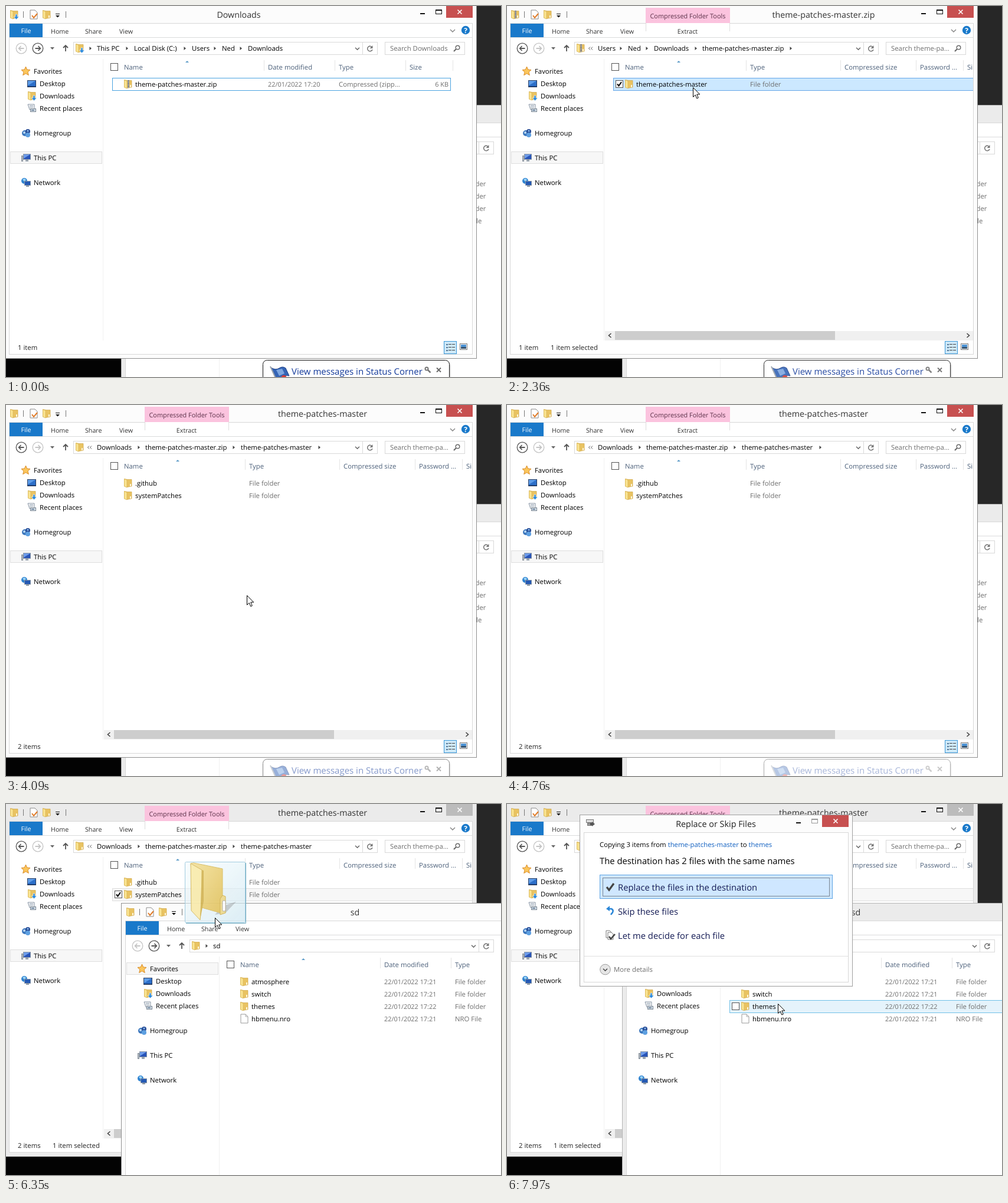
An HTML page that plays this animation: 839 by 630 pixels, repeating every 8 s.

```html
<!DOCTYPE html>
<html lang="en">
<head>
<meta charset="utf-8">
<title>Copying theme patches</title>
<style>
html, body { margin: 0; width: 100%; height: 100%; overflow: hidden; background: #030303; }
svg { display: block; width: 839px; height: 630px; }
text { font-family: "Open Sans", "Noto Sans", sans-serif; text-rendering: geometricPrecision; white-space: pre; }
</style>
</head>
<body>
<svg id="stage" viewBox="0 0 839 630" xmlns="http://www.w3.org/2000/svg"></svg>
<script>
const LOOP = 8000, STEP = 68.4;
const stage = document.getElementById('stage');
const GREY = '#6d6d6d', HEAD = '#4c607a', BLUE = '#1979ca';

// Drawing helpers; y of text is its visual middle
const rect = (x, y, w, h, fill, extra = '') => `<rect x="${x}" y="${y}" width="${w}" height="${h}" fill="${fill}" ${extra}/>`;
const box = (x, y, w, h, fill, line) => rect(x + .5, y + .5, w - 1, h - 1, fill, `stroke="${line}"`);
const path = (d, fill, line = 'none', w = 1) => `<path d="${d}" fill="${fill}" stroke="${line}" stroke-width="${w}"/>`;
const stroke = (d, line, w = 1) => path(d, 'none', line, w);
const circle = (x, y, r, fill, line = 'none', w = 1) => `<circle cx="${x}" cy="${y}" r="${r}" fill="${fill}" stroke="${line}" stroke-width="${w}"/>`;
const text = (x, y, s, fill = '#000', size = 11.35, anchor = 'start') =>
  `<text x="${x}" y="${Math.round(y + size * .36)}" font-size="${size}" fill="${fill}" text-anchor="${anchor}">${s}</text>`;
const at = (x, y, body, extra = '') => `<g transform="translate(${x} ${y})" ${extra}>${body}</g>`;
const chevron = (x, y, r = 3.5, line = '#555') => stroke(`M${x - r},${y - r / 2}l${r},${r}l${r},${-r}`, line, 1.5);
const vline = (x, y, h, line = '#e4e4e4') => rect(x, y, 1, h, line);

const folder = () => path('M.5 .5L6 1.500H13V13L5 14.500L.5 13Z', '#e9c362', '#cfa546', .7) +
  path('M.5 .5L5 2.500V15L.5 13Z', '#f9e391', '#d6b04e', .6) + rect(10, 9, 2, 4, '#fff8df');
const icons = {
  folder,
  zip: () => folder() + rect(6, 1, 3, 13, '#b9b9b9') + stroke('M7.5 1V14', '#5c5c5c', 3).replace('/>', ' stroke-dasharray="1 1.5"/>'),
  down: () => folder() + path('M9 7H12V11H15L10.500 16L6 11H9Z', '#2b8be0', '#fff', .6),
  file: () => path('M1 0H9L13 4V15H1Z', '#fff', '#999') + stroke('M9 0V4H13', '#aaa'),
  task: () => path('M1 0H9L13 4V15H1Z', '#fff', '#8b8b8b') + stroke('M4 9L7 13L13 6', '#e07b28', 2),
  star: () => path('M7.5 0L9.700 5L15 5.500L11 9.200L12.300 14.500L7.500 11.700L2.700 14.500L4 9.200L0 5.500L5.300 5Z', '#fbc65c', '#d98a25'),
  desk: () => box(0, 2, 15, 12, '#2d6fc9', '#2b3f63') + path('M1 3H14L1 11Z', '#5d9ce8') + rect(1, 12, 13, 1, '#173a72'),
  recent: () => path('M1 1H12V10H4Z', '#f4f4f4', '#8795a5') + stroke('M4 3.500H10M4 6H10M5 8.500H10', '#8fa1b4') + box(5, 8, 10, 6, '#dbe4ec', '#75828f') + rect(7, 10, 5, 2, '#778ca3'),
  group: () => circle(6, 8, 5, '#3b76bd') + circle(11, 5, 4, '#2a4d96') + circle(11, 11, 4, '#5d9fe0') + circle(5, 7, 2, '#b9d8f4') + circle(11, 4, 1.5, '#8fc0ef'),
  pc: () => box(3, 1, 13, 10, '#2854b8', '#8c97a5') + path('M4 2H15L4 9Z', '#6c9bea') + rect(7, 11, 5, 3, '#9aa5b1') + box(0, 4, 3, 10, '#ccd3db', '#7e8893'),
  net: () => circle(5, 5, 5, '#2f83d0') + path('M2 3Q5 -1 8 3L5 6Z', '#9bd3f5') + box(5, 5, 11, 8, '#2459b4', '#8794a3') + rect(8, 13, 5, 2, '#8d99a6')
};
const icon = (name, x, y) => at(x, y, icons[name]());

const check = (x, y, on) => box(x, y, 13, 13, '#fff', '#555') + (on ? stroke(`M${x + 3} ${y + 6.500}L${x + 5.500} ${y + 9.500}L${x + 10} ${y + 3}`, '#000', 2) : '');
const rowLook = {
  focus: ['#fff', '#4ba3e0'], hover: ['#e5f3fb', '#70c0e7'], sel: ['#cce8ff', '#66a7e8'],
  old: ['#f7f7f7', '#dedede'], drop: ['#d1e8ff', '#84bdee']
};

function navPane(mark) {
  const items = [['star', 111, 'Favorites'], ['desk', 132, 'Desktop', 10], ['down', 153, 'Downloads', 10], ['recent', 174, 'Recent places', 10],
    ['group', 216, 'Homegroup'], ['pc', 258, 'This PC'], ['net', 300, 'Network']];
  return box(7, mark - 11, 156, 21, '#f7f7f7', '#dedede') +
    items.map(([i, y, s, dx = 0]) => icon(i, 26 + dx + (i === 'down' ? 1 : 0), y - 8) + text(47 + dx, y, s)).join('');
}

function captions(x, y, active, maxLine = '#111') {
  return rect(x - 44, y + 12, 8, 2, '#111') + box(x - 18, y + 6, 11, 8, 'none', maxLine) + rect(x - 18, y + 6, 11, 2, maxLine) +
    rect(x, y, 45, 20, active ? '#c75050' : '#bcbcbc') + stroke(`M${x + 19.500} ${y + 6.500}l7 7m0 -7l-7 7`, '#fff', 1.6);
}

function roundButton(x, on, dir) {
  const c = on ? '#555' : '#c4c4c4';
  return circle(x, 72, 8.8, '#fff', c, 1.3) + stroke(`M${x - 4.500 * dir} 72H${x + 4 * dir}M${x + .5 * dir} 68l${3.8 * dir} 4l${-3.8 * dir} 4`, c, 1.8);
}

function explorer(o) {
  const skin = o.active ? '#fcfcfc' : '#ebebeb';
  let s = box(-2, -1, 800, 600, skin, o.active ? '#8f8f8f' : '#b5b5b5') + box(5, 29, 786, 563, '#fff', '#d8d8d8');
  // title bar
  s += icon(o.icon, 7, 7) + vline(29, 9, 11, '#777') + icon('task', 40, 7) + icon('folder', 62, 7) +
    rect(84, 13, 7, 1, '#111') + path('M84 16h7l-3.500 3.500Z', '#111') + vline(101, 9, 11, '#777');
  s += text(o.tools ? 536.5 : 394.5, 15, o.title, '#333', 14.25, 'middle') + captions(746, 0, o.active);
  // ribbon tabs
  s += rect(6, 53, 784, 1, '#dadbdc') + rect(6, 30, 56, 23, BLUE) + text(34, 42, 'File', '#fff', 10.7, 'middle') +
    text(76, 43, 'Home', '#333', 10.7) + text(134, 43, 'Share', '#333', 10.7) + text(192, 43, 'View', '#333', 10.7);
  if (o.tools) s += rect(235, 3, 143, 26, '#fbc3de') + rect(236, 29, 141, 1, '#fff') + text(306.5, 17, 'Compressed Folder Tools', '#5b3149', 10.9, 'middle') +
    vline(235, 29, 14, '#ddd') + vline(377, 29, 14, '#ddd') + text(306, 43, 'Extract', '#333', 10.7, 'middle');
  s += chevron(757, 42, 4, '#888') + circle(779, 41, 7.2, BLUE) + `<text x="779" y="45.500" font-size="12" font-weight="700" fill="#fff" text-anchor="middle">?</text>`;
  // address row
  s += roundButton(26, o.back, -1) + roundButton(54, !o.back, 1) + path('M75 70h7l-3.500 4Z', '#666') +
    stroke('M101 77V67M97 71l4 -4l4 4', '#555', 1.8);
  s += box(114, 61, 491, 22, '#fff', '#d9d9d9') + box(604, 61, 26, 22, '#fff', '#d9d9d9') + box(642, 61, 136, 22, '#fff', '#d9d9d9');
  s += chevron(595.5, 72.5, 3.5, '#666') + stroke('M620.500 70a4.300 4.300 0 1 0 .5 4', '#777', 1.6) + path('M621.500 67v5h-5Z', '#777');
  s += icon(o.icon, 118, 64) + text(651, 72, o.search, GREY) + circle(765.5, 70.5, 3.3, 'none', '#666', 1.4) + stroke('M763 73L759 77', '#666', 2);
  for (const [x, c] of o.crumbs) {
    s += c === '>' ? path(`M${x - 1.500} 69l3.500 3l-3.500 3Z`, '#444') : c === '<' ? stroke(`M${x - 1} 69.500l-2.500 2.500l2.500 2.500m4 -5l-2.500 2.500l2.500 2.500`, '#555') : text(x, 72, c);
  }
  // panes
  s += navPane(o.mark) + vline(164, 90, 478, '#f1f1f1') + check(177, 97) + path(`M${o.sort - 3} 96l3 -3l3 3Z`, '#5c9bc8');
  s += text(200, 104, 'Name', HEAD) + o.cols.map(([x, c, line]) => text(x, 104, c, HEAD) + vline(line, 92, 18)).join('') + (o.end ? vline(o.end, 92, 18) : '');
  o.rows.forEach((r, i) => {
    const y = 133 + 21 * i;
    if (r.look) s += box(180, y - 11, (o.scroll ? 796 : 754) - 180, 22, ...rowLook[r.look]);
    if (/hover|sel|old/.test(r.look)) s += check(184, y - 7, r.look !== 'hover');
    s += icon(r.icon, 200, y - 8) + text(219, y, r.name) +
      r.cells.map(([x, c]) => text(x, y, c, GREY, /^\d/.test(c) ? 10.9 : 11.35, c.endsWith('KB') ? 'end' : 'start')).join('');
  });
  if (o.scroll) s += rect(166, 552, 624, 16, '#f0f0f0') + rect(183, 552, 373, 15, '#cdcdcd') +
    stroke('M176.500 556l-4 3.500l4 3.500M779.500 556l4 3.500l-4 3.500', '#444', 1.6);
  // status bar
  s += o.status.map(([x, c]) => text(x, 580, c, '#222')).join('');
  s += box(742, 569, 22, 22, '#cde8f8', '#3a98d8') + [574, 579, 584].map(y => rect(746, y, 3, 2, '#587a99') + rect(750, y, 5, 1, '#444') + rect(756, y, 5, 1, '#444')).join('');
  s += box(769, 573, 13, 11, '#fff', '#777') + rect(771, 575, 9, 5, '#4a90d2') + rect(771, 579, 9, 3, '#38546e');
  return s + rect(790, 54, 1, 537, '#d8d8d8') + rect(791, 54, 6, 537, skin);
}

const patches = 'theme-patches-master';
const innerCols = [[412, 'Type', 405], [572, 'Compressed size', 565], [700, 'Password ...', 693], [780, 'Si', 773]];
const fileCols = [[444, 'Date modified', 437], [564, 'Type', 557], [684, 'Size', 677]];
const dir = (name, look) => ({ icon: 'folder', name, look, cells: [[412, 'File folder']] });

function mainView(t) {
  const active = t < 4740;
  if (t < 1860) {
    const sel = t >= 1385;
    return explorer({
      active, icon: 'down', title: 'Downloads', tools: sel, back: false, mark: 258, search: 'Search Downloads', sort: 307, end: 757, cols: fileCols,
      crumbs: [[143, '>'], [154, 'This PC'], [205, '>'], [217, 'Local Disk (C:)'], [303, '>'], [315, 'Users'], [354, '>'], [366, 'Ned'], [398, '>'], [410, 'Downloads']],
      rows: [{ icon: 'zip', name: patches + '.zip', look: sel ? 'sel' : t >= 1110 ? 'hover' : 'focus', cells: [[444, '22/01/2022 17:20'], [564, 'Compressed (zipp...'], [750, '6 KB']] }],
      status: [[20, '1 item'], ...(sel ? [[74, '1 item selected'], [159, '5,91 KB']] : [])]
    });
  }
  const inner = { active, tools: true, back: true, mark: 258, search: 'Search theme-pa...', sort: 291, cols: innerCols, scroll: true };
  if (t < 2540) {
    return explorer({
      ...inner, icon: 'zip', title: patches + '.zip',
      crumbs: [[142, '<'], [154, 'Users'], [193, '>'], [205, 'Ned'], [237, '>'], [249, 'Downloads'], [320, '>'], [331, patches + '.zip'], [481, '>']],
      rows: [dir(patches, t < 2260 ? 'hover' : 'sel')], status: [[20, '1 item'], ...(t < 2260 ? [] : [[74, '1 item selected']])]
    });
  }
  const picked = t >= 5780;
  return explorer({
    ...inner, icon: 'folder', title: patches,
    crumbs: [[142, '<'], [154, 'Downloads'], [225, '>'], [236, patches + '.zip'], [386, '>'], [398, patches], ...(active ? [[531, '>']] : [])],
    rows: [dir('.github', t < 3110 ? 'hover' : ''), dir('systemPatches', picked ? 'old' : t >= 5430 ? 'hover' : '')],
    status: [[20, '2 items'], ...(picked ? [[79, '1 item selected']] : [])]
  });
}

const cards = ['atmosphere', 'switch', 'themes'];
function cardView(t, over) {
  const cells = (time, type) => [[444, '22/01/2022 ' + time], [564, type]];
  const rows = cards.map((name, i) => ({ icon: 'folder', name, look: over !== i ? '' : t >= 7760 ? 'hover' : 'drop', cells: cells(i === 2 ? '17:22' : '17:21', 'File folder') }));
  rows.push({ icon: 'file', name: 'hbmenu.nro', look: '', cells: cells('17:21', 'NRO File') });
  return at(197, 169, explorer({
    active: t >= 4740 && t < 7950, icon: 'folder', title: 'sd', back: false, mark: 111, search: 'Search sd', sort: 307, cols: fileCols, end: 757,
    crumbs: [[143, '>'], [154, 'sd']], rows, status: [[20, '4 items']]
  }));
}

function balloon(t) {
  const o = Math.max(0, Math.min(1, 1 - (t - 1900) / 4400));
  return o && `<g opacity="${o.toFixed(3)}">` + rect(438, 604, 316, 40, '#0002', 'rx="7"') + rect(435.5, 601.5, 316, 40, '#fff', 'rx="7" stroke="#111"') +
    path('M449 614Q457 619 463 615T474 615L480 628Q471 626 466 632H457Z', '#3464b5', '#1d3f86') + path('M458 618L468 616L472 624L463 628Z', '#7ea6df') +
    stroke('M448 612L457 632', '#9aa3ad', 2) + circle(471, 632, 5, '#d43a35') +
    text(484, 621, 'View messages in Status Corner', '#12399a', 15) +
    circle(713, 616, 2.5, 'none', '#777', 2) + stroke('M715 618l4.500 4.500', '#777', 2.5) + stroke('M730 614.500l7 7m0 -7l-7 7', '#666', 1.8) + '</g>';
}

function dragged(x, y, over) {
  let s = rect(-50.5, -94.5, 102, 103, 'url(#glass)', 'rx="2" stroke="#9cc9de"') + path('M52.500 -93V9.500H-49', 'none', '#6aa6bd', 1) +
    path('M0 -5L18 -8L36 -27L14 -20Z', '#8886') +
    path('M-41 -92L-36 -93L13 -83V-7L-22 -17L-36 -22Z', 'url(#gold)', '#d8bd62') +
    path('M-41 -92L-22 -81V-31L-25 4L-40 -12Z', '#f8ebae', '#d2b65f') + path('M-22 -81L-19 -80V-28L-25 4Z', '#d3b557') +
    path('M13 -38L18 -36V-8L9 -5V-32Z', '#ecd98e', '#cfb153') + rect(13, -29, 5, 18, '#fff', 'rx="2" stroke="#aaa"');
  if (y > 258) {
    const name = over < 0 ? 'sd' : cards[over], w = [84, 129, 107, 113][over + 1];
    s += box(10, 10, w, 20, '#fff', '#6d6d6d') + stroke('M14 20h10M19 15v10', '#1e5fb4', 3) +
      `<text x="30" y="24" font-size="11.350" fill="#1d3fb0">Copy to <tspan fill="#1a1a5c">${name}</tspan></text>`;
  }
  return at(x, y, s, 'opacity=".94"');
}

function dialog() {
  const ink = '#151c55', link = '#0f5fc0';
  let s = box(123, 18, 463, 292, '#fcfcfc', '#a0a0a0') + box(130, 48, 449, 255, '#fff', '#d8d8d8');
  s += box(134, 26, 13, 6, '#ddd', '#777') + box(136, 32, 9, 5, '#999', '#777') + path('M141 32h3v-2l5 4l-5 4v-2h-3Z', '#555');
  s += text(354, 33.5, 'Replace or Skip Files', '#222', 14.4, 'middle') + captions(534, 19, true, '#999');
  s += `<text x="157" y="73" font-size="11.350">Copying 3 items from <tspan fill="${link}">${patches}</tspan> to <tspan fill="${link}">themes</tspan></text>`;
  s += text(157, 97, 'The destination has 2 files with the same names', '#000', 14.8);
  s += box(157, 120, 395, 41, '#cfe7ff', '#5fa6e4') + rect(162.5, 125.5, 384, 31, 'none', 'stroke="#222" stroke-dasharray="1 1"');
  s += stroke('M169 141L173 146L181 135', '#444', 3.2) + text(188, 141.5, 'Replace the files in the destination', ink, 14.77);
  s += stroke('M171 178H177Q181 180 179 184L176 188', '#2b87d8', 2.6) + path('M168 178l6 -5v9Z', '#2b87d8') + text(188, 182.5, 'Skip these files', ink, 14.77);
  s += path('M168 215h6l3 3v9h-9Z', '#fff', '#777') + path('M171 218h6l3 3v9h-9Z', '#fff', '#777') + stroke('M173 225l3 4l7 -8', '#444', 2.6) +
    text(188, 223.5, 'Let me decide for each file', ink, 14.77);
  s += rect(131, 258, 447, 1, '#dfdfdf') + circle(166.5, 281, 8.8, '#e6e6e6', '#999') + chevron(166.5, 281.5, 3.5, '#444') + text(181, 281, 'More details', GREY, 11.4);
  return s;
}

// Pointer path: time, x, y
const route = [[430, 378, -8], [700, 352, 58], [976, 311, 141], [1110, 316, 137], [1730, 316, 136], [2400, 315, 138], [3097, 315, 138],
  [3230, 397, 195], [3580, 673, 310], [3710, 705, 344], [3780, 694, 344], [3850, 653, 344], [3918, 612, 344], [3987, 475, 332], [4055, 408, 323],
  [4190, 389, 420], [4600, 402, 632], [4860, 400, 632], [5220, 297, 258], [5423, 256, 158],
  [5830, 256, 158], [5970, 262, 167], [6245, 336, 178], [6520, 410, 240], [6791, 462, 292], [7065, 458, 337], [7135, 459, 339], [LOOP, 459, 339]];
function pointer(t) {
  if (t < route[0][0]) return [378, -40];
  const i = route.findIndex(p => p[0] > t), [a, ax, ay] = route[i - 1], [b, bx, by] = route[i], f = (t - a) / (b - a);
  return [Math.round(ax + (bx - ax) * f), Math.round(ay + (by - ay) * f)];
}

const defs = `<defs><linearGradient id="gold" x2="1" y2="1"><stop stop-color="#f3e2a0"/><stop offset="1" stop-color="#e2c463"/></linearGradient>
<linearGradient id="glass" x2="1" y2="1"><stop stop-color="#eef8fc" stop-opacity=".45"/><stop offset="1" stop-color="#cfe8f2" stop-opacity=".75"/></linearGradient></defs>`;

function scene(t) {
  const [x, y] = pointer(t), drag = t >= 5900 && t < 7760;
  const over = t > 6700 && y >= 294 ? Math.min(2, Math.floor((y - 291) / 21)) : -1;
  const back = mainView(t), card = cardView(t, over);
  return defs + rect(0, 0, 839, 630, '#030303') + rect(700, 0, 139, 168, '#272727') +
    (t < 4740 ? card + back : back + card) + balloon(t) +
    (drag ? dragged(x, y, over) : '') + (t >= 7950 ? dialog() : '') +
    at(x + .5, y + .5, path('M0 0V16L3.700 12.500L6.300 18.500L8.800 17.400L6.300 11.500H11.300Z', '#fff', '#000'));
}

let last = null;
function update(now) {
  const t = now % LOOP;
  const held = t < 430 ? 0 : 430 + Math.floor((t - 430) / STEP) * STEP;
  if (held !== last) stage.innerHTML = scene(last = held);
}
const start = performance.now();
function tick() {
  update(performance.now() - start);
  requestAnimationFrame(tick);
}
tick();
</script>
</body>
</html>
```
